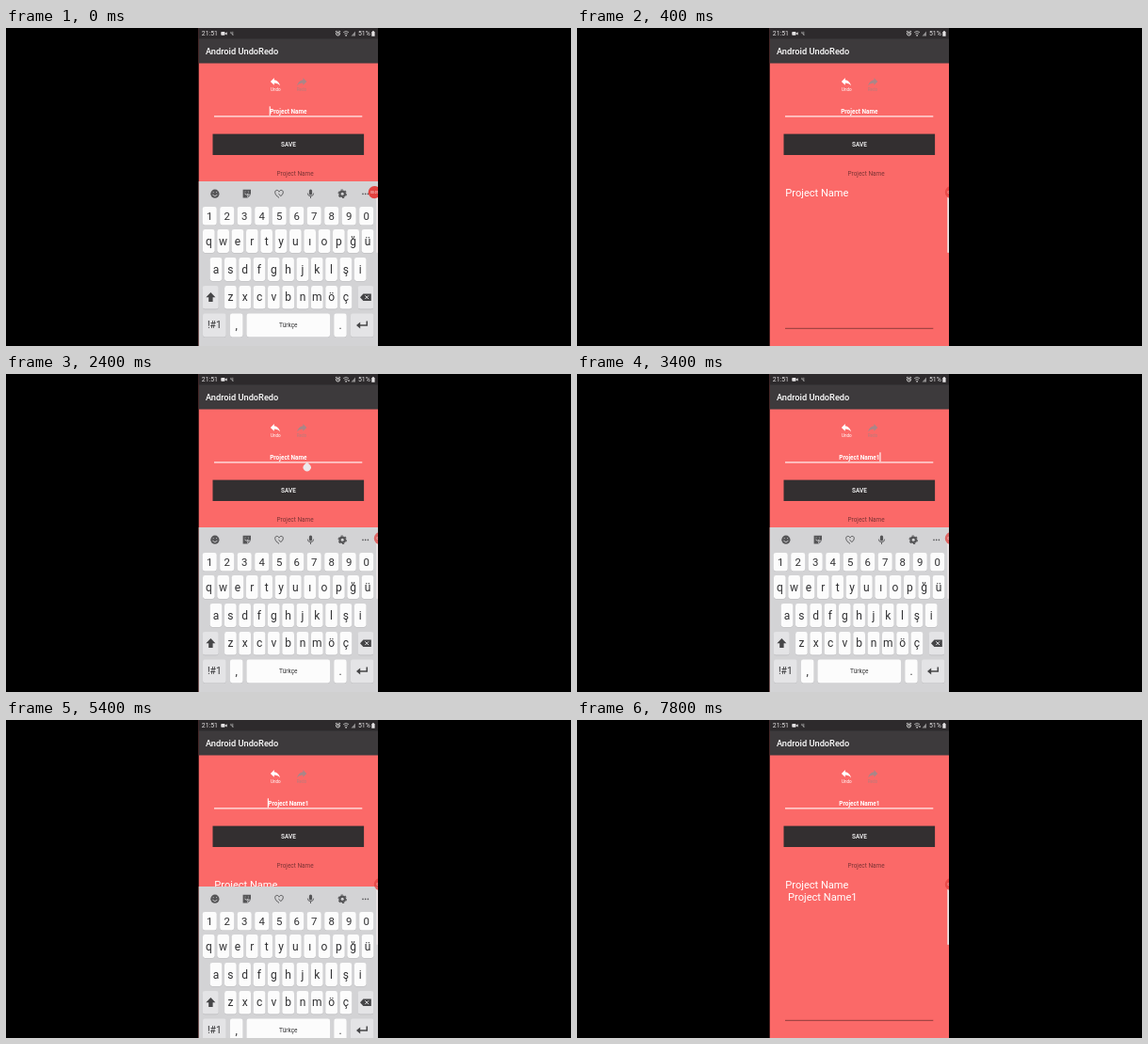
These frames come from a looping animation (600x338 px, 8 s). An HTML page:

```html
<!DOCTYPE html>
<html lang="en">
<head>
<meta charset="utf-8">
<title>Undo and redo demo</title>
<style>
html, body { margin: 0; width: 100%; height: 100%; overflow: hidden; background: #000; }
svg { display: block; width: 100%; height: 100%; font-family: Roboto, sans-serif; }
</style>
</head>
<body>
<svg viewBox="0 0 600 338">
  <defs>
    <clipPath id="screen"><rect x="204.7" width="190.3" height="338"/></clipPath>
    <path id="arrow" d="M10 9V5l-7 7 7 7v-4.1c5 0 8.5 1.6 11 5.1-1-5-4-10-11-11z"/>
  </defs>
  <rect width="600" height="338"/>
  <g clip-path="url(#screen)">
    <rect x="204" width="192" height="338" fill="#fb6968"/>
    <rect x="204" width="192" height="37.5" fill="#3d3a3c"/>
    <rect x="204" width="192" height="11.5" fill="#2d2a2c"/>

    <g id="status" fill="#e4e2e3" font-size="6.9">
      <text x="207.8" y="8.4">21:51</text>
      <rect x="228.3" y="4" width="4.2" height="3.8" rx=".8"/>
      <path d="M232.3 5.9l2.4-1.6v3.2z"/>
      <path d="M239 3.8v2M240.8 3.8v4M238.4 5l3 2.4" stroke="#bbb" stroke-width=".7"/>
      <g fill="none" stroke="#e4e2e3" stroke-width=".9">
        <circle cx="352.5" cy="6" r="2"/>
        <path d="M352.5 4.8v1.3h1M349.9 4l1.3-1.1M355.1 4l-1.3-1.1"/>
        <path d="M358.2 4.6q2.9-2.4 5.8 0M359.3 6.2q1.8-1.5 3.6 0" stroke="#bbb"/>
      </g>
      <circle cx="361.1" cy="7.9" r=".8"/>
      <rect id="signal" x="363.3" y="6.3" width="1.4" height="1.4"/>
      <path d="M366.5 8.6l4.5-5v5z" fill="#8f8d8e"/>
      <text x="374" y="8.4">51%</text>
      <path d="M388.3 4h.9v-.9h1.5V4h.9v4.8h-3.3z"/>
    </g>
    <text x="211.9" y="27.5" font-size="9.25" font-weight="500" fill="#fff">Android UndoRedo</text>

    <g text-anchor="middle" font-size="4.62">
      <use href="#arrow" transform="translate(279.2 50.2) scale(.56)" fill="#fff"/>
      <text x="286.3" y="67" fill="#fff">Undo</text>
      <use href="#arrow" transform="translate(321 50.2) scale(-.56 .56)" fill="#a98688"/>
      <text x="314" y="67" fill="#b87b7c">Redo</text>
    </g>

    <rect x="221" y="93.4" width="157.3" height="1.1" fill="#fff"/>
    <text id="field" x="299.9" y="90.8" font-size="6.45" font-weight="700" fill="#fff" text-anchor="middle"></text>
    <rect x="219.5" y="112.6" width="160.6" height="22.4" fill="#332f30"/>
    <text x="299.9" y="126.2" font-size="6.47" font-weight="500" fill="#fff" text-anchor="middle">SAVE</text>
    <text x="307.1" y="156.5" font-size="6.47" fill="#7d3435" text-anchor="middle">Project Name</text>
    <g font-size="11.09" fill="#fff">
      <text x="221.3" y="178.6">Project Name</text>
      <text id="line2" x="224.1" y="191.6">Project Name1</text>
    </g>
    <rect x="221" y="318.8" width="157.3" height="1" fill="#8f3c3c"/>

    <rect id="caret" y="83.3" width="1.1" height="9.8" fill="#fff"/>
    <path id="handle" d="M0-5.4L3-2.8A4.1 4.1 0 1 1-3-2.8z" fill="#ece9ec"/>

    <g id="keyboard">
      <rect x="204" y="163" width="192" height="178" fill="#d3d3d5"/>
      <g id="tools" fill="#555557">
        <circle cx="221.9" cy="176.2" r="4.6"/>
        <path d="M251.6 171.8h8.4v5.4l-3.2 3.2h-5.2z"/>
        <g fill="none" stroke="#d3d3d5" stroke-width=".9">
          <path d="M219.4 177.2q2.5 3 5 0M220.2 174.2v1M223.6 174.2v1"/>
          <path d="M253.4 176q2 2.4 4 0M254 173.6v.8M257.4 173.6v.8M256.8 180.4v-3.2h3.2"/>
        </g>
        <path d="M290 180.4c-6-4-4.6-8-2.3-8 1.3 0 2.1.8 2.3 1.8.5-1.2 1.3-1.8 2.3-1.8 2.2 0 3.2 3.3-.4 6.2l-2.5-2.4" fill="none" stroke="#555557" stroke-width="1"/>
        <rect x="321.9" y="171.4" width="3.2" height="6.2" rx="1.6"/>
        <path d="M320.4 175.6a3.1 3.1 0 0 0 6.2 0M323.5 178.8v2.2" fill="none" stroke="#555557" stroke-width=".9"/>
        <circle cx="357.2" cy="176.2" r="3.8"/>
        <circle cx="357.2" cy="176.2" r="4.2" fill="none" stroke="#555557" stroke-width="1.1" stroke-dasharray="2.2"/>
        <circle cx="357.2" cy="176.2" r="1.5" fill="#d3d3d5"/>
        <circle cx="379" cy="176.4" r=".8"/><circle cx="381.7" cy="176.4" r=".8"/><circle cx="384.4" cy="176.4" r=".8"/>
      </g>
      <g id="keys" text-anchor="middle" fill="#303032"></g>
      <g fill="#454547">
        <path d="M217.4 281l5 5.2h-2.8v4.8h-4.4v-4.8h-2.8z"/>
        <path d="M376 286.2l3.4-3.8h8.4v7.6h-8.4z"/>
        <path d="M381.3 284.3l3.8 3.8m0-3.8l-3.8 3.8" stroke="#e4e4e6"/>
        <path d="M383.3 311.4v4.6h-9" fill="none" stroke="#454547" stroke-width="1.5"/>
        <path d="M372 316l4.2-3.4v6.8z"/>
      </g>
      <g id="popup">
        <rect x="208.4" y="164.2" width="16.6" height="19.6" rx="3" fill="#fdfdfd"/>
        <text x="216.6" y="178" font-size="11.6" text-anchor="middle" fill="#303032">1</text>
      </g>
    </g>

    <rect x="393.3" y="179" width="1.7" height="60" rx=".8" fill="#ece6e7"/>
    <g id="badge">
      <circle r="6.6" fill="#e2423f"/>
      <text y="1.1" font-size="3.2" fill="#fff" text-anchor="middle">00:01</text>
    </g>
  </g>
</svg>
<script>
const LOOP = 8000, STEP = 200;
const $ = id => document.getElementById(id);
const show = (id, on) => $(id).setAttribute('visibility', on ? 'visible' : 'hidden');
const move = (id, x, y) => $(id).setAttribute('transform', `translate(${x} ${y})`);
const within = (t, spans) => spans.some(([a, b]) => t >= a && t < b);

// Keyboard
const keys = [];
function key(label, cx, y, w, h, size = 12, fill = '#fcfcfc') {
  keys.push(`<rect x="${cx - w / 2}" y="${y + .6}" width="${w}" height="${h}" rx="2.4" fill="#b9b9bc"/>
    <rect x="${cx - w / 2}" y="${y}" width="${w}" height="${h}" rx="2.4" fill="${fill}"/>
    <text x="${cx}" y="${y + h / 2 + size * .335}" font-size="${size}">${label}</text>`);
}
function row(chars, x, step, y, w, h, size) {
  [...chars].forEach((c, i) => key(c, x + i * step, y, w, h, size));
}
const GREY = '#e4e4e6';
row('1234567890', 216.2, 18.5, 190, 15, 19.4, 11.4);
row('qwertyuıopğü', 215.3, 15.34, 214, 12.6, 25);
row('asdfghjklşi', 223, 15.32, 244, 12.6, 25);
row('zxcvbnmöç', 238.4, 15.32, 274, 12.6, 24.6);
key('', 217.2, 274, 17, 24.6, 12, GREY);
key('', 382, 274, 16.6, 24.6, 12, GREY);
key('!#1', 221.3, 303.6, 24.8, 24.8, 10.3, GREY);
key(',', 244.7, 303.6, 13.6, 24.8);
key('Türkçe', 299.8, 303.6, 88.6, 24.8, 6.5);
key('.', 355, 303.6, 13.4, 24.8);
key('', 378.2, 303.6, 24.6, 24.8, 12, GREY);
$('keys').innerHTML = keys.join('');

const caretOn = [[0, 200], [800, 1200], [1800, 2400], [3000, 3800], [4200, 4800],
  [5400, 5800], [6400, 6800], [7400, 7800]];

// [start, keyboard drop]
const drops = [[0, 0], [200, 4], [400, 180], [2200, 60], [2400, 0], [5400, 14], [5600, 180]];

function draw(t) {
  const typed = t >= 3200;
  $('field').textContent = 'Project Name' + (typed ? '1' : '');
  show('line2', t >= 5400);

  const caretX = t < 2000 ? 279.7 : t < 3200 ? 319.5 : t < 4400 ? 321.4 : 277.8;
  $('caret').setAttribute('x', caretX);
  show('caret', within(t, caretOn));
  show('handle', within(t, [[2000, 3400]]));
  move('handle', typed ? 321.9 : 319.7, t < 2200 ? 98.2 : 99.2);

  move('keyboard', 0, drops.findLast(d => t >= d[0])[1]);
  show('popup', within(t, [[3200, 3400]]));

  const docked = t >= 200;
  move('badge', docked ? 397.4 : 391.3, 174.6);
  $('badge').setAttribute('opacity', docked ? .75 : 1);
  show('signal', within(t, [[1600, 2600], [5800, LOOP]]));
}

const start = performance.now();
function tick() {
  const t = (performance.now() - start) % LOOP;
  draw(Math.floor(t / STEP) * STEP);
  requestAnimationFrame(tick);
}
tick();
</script>
</body>
</html>
```
